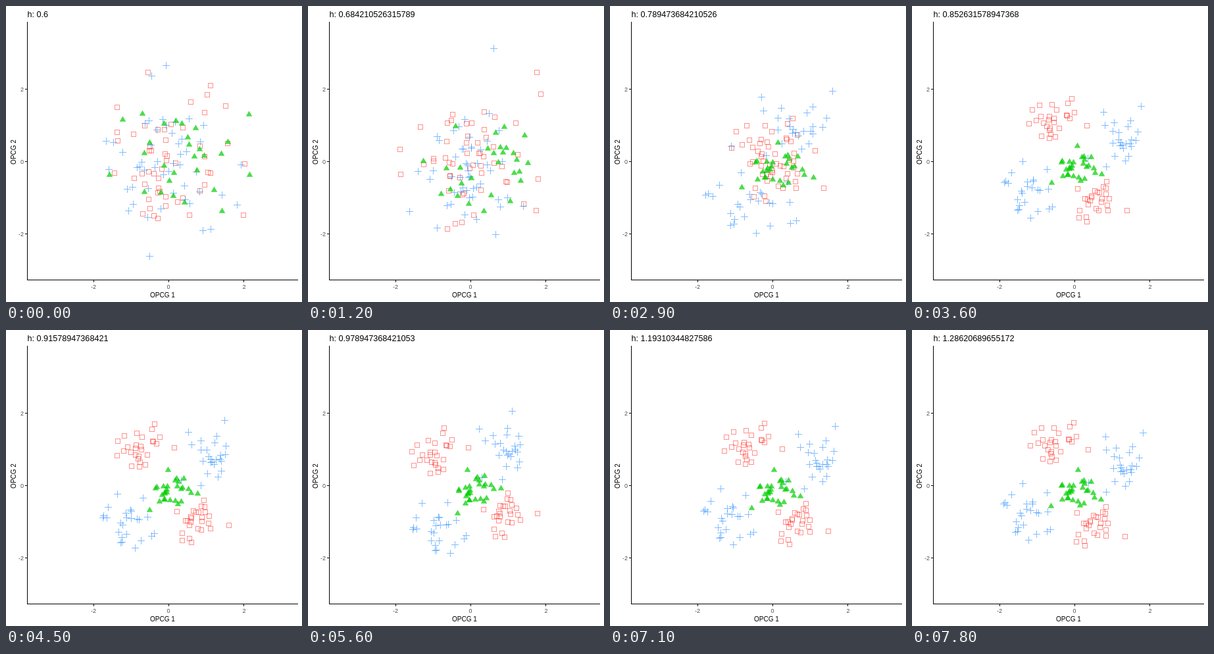
An HTML page that plays this animation: 450x450 px, repeating every 8000 ms.

```html
<!DOCTYPE html>
<html lang="en">
<head>
<meta charset="utf-8">
<title>OPCG scatter</title>
<style>
html, body { margin: 0; width: 100%; height: 100%; overflow: hidden; background: #fff; }
svg { display: block; width: 450px; height: 450px; font-family: "Liberation Sans", Arial, sans-serif; }
.axis { stroke: #000; fill: none; shape-rendering: crispEdges; }
.tick { font-size: 9px; fill: #4d4d4d; }
.name { font-size: 10px; text-anchor: middle; }
.mark { fill: none; shape-rendering: crispEdges; }
.red { stroke: rgba(255, 55, 48, .55); }
.blue { stroke: rgba(30, 135, 255, .55); }
.green { fill: rgba(0, 205, 0, .7); shape-rendering: auto; }
</style>
</head>
<body>
<svg viewBox="0 0 450 450">
  <text id="title" x="32.5" y="16.5" font-size="12.65"></text>
  <path class="axis" d="M32.5 24V416.5H444M29 126.5h3M29 236.5h3M29 346.5h3M133.5 417v3M247.5 417v3M361.5 417v3"/>
  <g class="tick" text-anchor="end">
    <text x="27" y="130">2</text><text x="27" y="240">0</text><text x="27" y="350">-2</text>
  </g>
  <g class="tick" text-anchor="middle">
    <text x="133" y="430">-2</text><text x="247" y="430">0</text><text x="362" y="430">2</text>
  </g>
  <text class="name" x="238" y="443">OPCG 1</text>
  <text class="name" transform="translate(15 222) rotate(-90)">OPCG 2</text>
  <g id="marks"></g>
</svg>
<script>
const CYCLE = 8000, STEP = 300, HOLD = 200;
const CLASSES = {
  red: { count: 53, shape: 'M-3.5-3.5h7v7h-7z' },
  blue: { count: 50, shape: 'M-5 .5H6M.5-5V6' },
  green: { count: 28, shape: 'M.5-5.5L5.3 2.8H-4.3z' }
};

// Per class: lobe centre x, y and spread x, y, in axis units.
// Red and blue have a second lobe mirrored through the origin.
const scattered = {
  red: [0, 0.1, 0.85, 0.9], blue: [0, 0, 0.9, 0.95], green: [0.35, 0.1, 0.85, 0.75]
};
const layered = {
  red: [0, 0, 0.65, 0.5], blue: [0, 1.4, 1.05, 0.4], green: [0.1, 0, 0.75, 0.5]
};
const lobed = {
  red: [-0.66, 1.18, 0.36, 0.36], blue: [1.22, 0.74, 0.4, 0.36], green: [0, 0, 0.42, 0.36]
};
const looks = [
  { at: 0, tilt: 0, shape: scattered },
  { at: 4, tilt: 0, shape: scattered },
  { at: 7.5, tilt: 0, shape: layered },
  { at: 12, tilt: 0, shape: lobed },
  { at: 18.5, tilt: 21, shape: lobed },
  { at: 21.5, tilt: 9, shape: lobed },
  { at: 26, tilt: -2, shape: lobed }
];
const SETTLED = 7.5;

let seed = 2024;
function random() {
  seed = (seed + 0x6D2B79F5) | 0;
  let r = Math.imul(seed ^ (seed >>> 15), 1 | seed);
  r ^= r + Math.imul(r ^ (r >>> 7), 61 | r);
  return ((r ^ (r >>> 14)) >>> 0) / 4294967296;
}

function gaussianPair() {
  const radius = Math.min(2.8, Math.sqrt(-2 * Math.log(1 - random())));
  const angle = random() * 2 * Math.PI;
  return [radius * Math.cos(angle), radius * Math.sin(angle)];
}

const points = Object.entries(CLASSES).flatMap(([color, { count, shape }]) =>
  Array.from({ length: count }, (_, i) => {
    const mark = document.createElementNS('http://www.w3.org/2000/svg', 'path');
    mark.setAttribute('class', 'mark ' + color);
    mark.setAttribute('d', shape);
    document.getElementById('marks').append(mark);
    const side = color !== 'green' && i % 2 ? -1 : 1;
    return { mark, color, side, early: gaussianPair(), late: gaussianPair() };
  }));
const title = document.getElementById('title');

const lerp = (a, b, f) => a + (b - a) * f;

function bandwidth(step) {
  const h = step < 20 ? 0.6 + 0.4 * step / 19 : 1.1 + 0.9 * (step - 20) / 29;
  return Number(h.toPrecision(15));
}

function draw(time) {
  const step = Math.floor(time / STEP);
  const position = Math.min(26, step + (time % STEP >= HOLD ? 0.5 : 0));
  const next = Math.max(1, looks.findIndex(look => look.at >= position));
  const from = looks[next - 1], to = looks[next];
  const f = (position - from.at) / (to.at - from.at);
  const tilt = lerp(from.tilt, to.tilt, f) * Math.PI / 180;
  const cos = Math.cos(tilt), sin = Math.sin(tilt);
  // Mixing the two draws along an arc reshuffles the points but keeps their spread.
  const shuffle = Math.min(1, position / SETTLED) * Math.PI / 2;

  for (const { mark, color, side, early, late } of points) {
    const [cx, cy, sx, sy] = from.shape[color].map((v, i) => lerp(v, to.shape[color][i], f));
    const noise = i => early[i] * Math.cos(shuffle) + late[i] * Math.sin(shuffle);
    const x = side * cx + sx * noise(0);
    const y = side * cy + sy * noise(1);
    const px = Math.round(247 + 57.2 * (x * cos - y * sin));
    const py = Math.round(236.5 - 55 * (x * sin + y * cos));
    mark.setAttribute('transform', `translate(${px} ${py})`);
  }
  title.textContent = 'h: ' + bandwidth(step);
}

const start = performance.now();
function tick() {
  draw((performance.now() - start) % CYCLE);
  requestAnimationFrame(tick);
}
tick();
</script>
</body>
</html>
```
